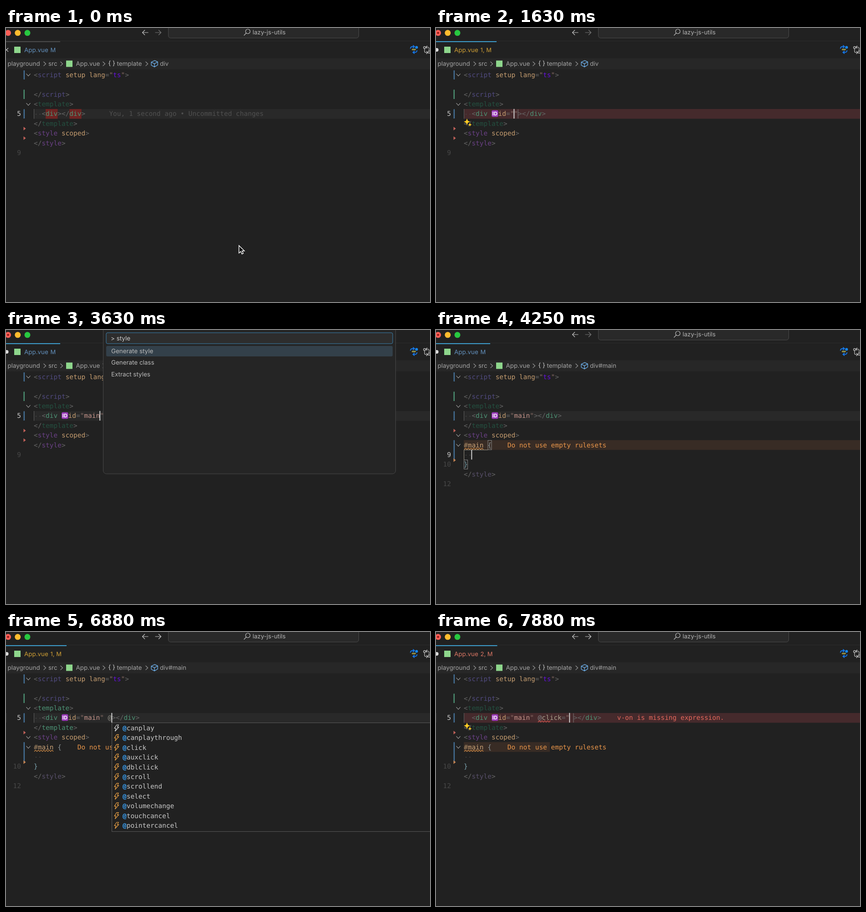
Animation, 931 px wide and 602 px high, one loop 8 s. Source, as an HTML page:

```html
<!DOCTYPE html>
<html lang="en">
<head>
<meta charset="utf-8">
<style>
html, body { margin: 0; width: 100%; height: 100%; overflow: hidden; background: #212121; }
svg { display: block; width: 931px; height: 602px; }
text { white-space: pre; text-rendering: geometricPrecision; }
.m { font: 14.46px "DejaVu Sans Mono", monospace; }
.u { font: 13.4px Inter, sans-serif; }
</style>
</head>
<body>
<svg id="stage" viewBox="0 0 931 602"></svg>
<script>
const LOOP = 8000, CW = 8.706, X0 = 61, PITCH = 21.4;
const stage = document.getElementById('stage');
const C = {
  p: '#666', div: '#4d9375', attr: '#c59d70', str: '#c5948b', quote: '#8b6f68',
  style: '#6b4186', scr: '#514b80', dim: '#245040'
};

const esc = s => s.replace(/&/g, '&amp;').replace(/</g, '&lt;');
const rowY = n => 102.8 + (n - 1) * PITCH;
const rect = (x, y, w, h, fill, more = '') => `<rect x="${x}" y="${y}" width="${w}" height="${h}" fill="${fill}" ${more}/>`;
const path = (d, stroke, w = 1.2, fill = 'none') => `<path d="${d}" stroke="${stroke}" stroke-width="${w}" fill="${fill}"/>`;
const circle = (x, y, r, fill, more = '') => `<circle cx="${x}" cy="${y}" r="${r}" fill="${fill}" ${more}/>`;
const mono = (x, y, s, fill) => `<text class="m" x="${x}" y="${y + 5}" fill="${fill}">${esc(s)}</text>`;
const ui = (x, y, s, fill = '#a5a5a5', size = 13.4) =>
  `<text class="u" x="${x}" y="${y + 4.8}" fill="${fill}" style="font-size:${size}px">${esc(s)}</text>`;

// Value of the last entry whose time has passed
const at = (t, list) => list.reduce((v, [time, next]) => t >= time ? next : v, null);
const within = (t, from, to) => t >= from && t < to;

// Coloured tokens in a row: text, colour, text, colour, ...
function tokens(x, y, ...list) {
  let out = '';
  for (let i = 0; i < list.length; i += 2) {
    out += mono(x, y, list[i], list[i + 1]);
    x += list[i].length * CW;
  }
  return out;
}

const down = (x, y) => path(`M${x - 4.5} ${y - 2.5}l4.5 5 4.5-5`, '#b0b0b0', 1.1);
const right = x => path(`M${x - 2.5} 74l5 4.7-5 4.7`, '#999');
const arrow = (x, dir, c) => path(`M${x - 6.5} 10h13M${x + dir} 4.5L${x + dir * 6.5} 10L${x + dir} 15.5`, c);
const marker = (y, c) => `<path d="M38.5 ${y - 4}l5 4-5 4z" fill="${c}"/>`;
const bar = (y, h) => rect(38.5, y, 2.6, h, 'url(#hatch)');
const caret = (x, y) => rect(x - 1, y - 10.6, 2, 21.2, '#d0d0d0');
const tabStop = x => rect(x - .5, 178.5, 1, 20.5, '#7d7d7d');
const dots = y => circle(66, y + 1, 1, '#4a4a4a') + circle(74.5, y + 1, 1, '#4a4a4a');

function wave(x, end, y, c) {
  let d = `M${x} ${y}`;
  for (let i = 0; x + i * 3 < end; i++) d += `l3 ${i % 2 ? 3 : -3}`;
  return path(d, c);
}

function windowBar(t, dirty) {
  let s = rect(0, 28, 931, 1, '#2b2b2b');
  ['#ff5f57', '#febc2e', '#28c840'].forEach((c, i) => s += circle(4.5 + i * 21.25, 10.8, 6.5, c));
  if (dirty) s += circle(4.5, 10.8, 2.3, '#8b1713');
  s += arrow(306, -1, '#c5c5c5') + arrow(334, 1, t >= 5630 ? '#c5c5c5' : '#777');
  s += rect(356.5, -10, 418, 32, '#292929', 'rx="5" stroke="#4a4a4a"');
  s += circle(531, 7.5, 5, 'none', 'stroke="#bbb" stroke-width="1.2"') + path('M527.5 11l-5 5.5', '#bbb');
  return s + ui(541.5, 9.6, 'lazy-js-utils', '#b5b5b5', 13.2);
}

function tabBar(t, dirty) {
  const tab = at(t, [[0, 0], [1500, 1], [2380, 0], [4500, 1], [7500, 2]]);
  const tone = ['#6391bd', '#cf9f35', '#dc7765'][tab];
  let s = rect(0, 29, [119, 133, 134.5][tab], 2, t >= 380 ? '#3b9ccc' : '#494949');
  s += dirty ? circle(1.5, 48, 4, '#ddd') : path('M-3 44l8 8M5 44l-8 8', '#ccc');
  s += rect(18, 41, 14, 14, '#8ed68c') + ui(40, 48, 'App.vue', tone);
  s += ui(97.5, 48, ['M', '1, M', '2, M'][tab], tone, 13);

  s += path('M888 45.5q0-4.5 4.5-4.5h4M893.5 38l3.5 3-3.5 3M902.5 49q0 4.5-4.5 4.5h-4M897 50.5l-3.5 3 3.5 3', '#1676e6', 1.8);
  s += rect(891, 45.5, 9, 3.5, '#8d8b45', 'rx="1.5"') + circle(901.5, 42.5, 3, '#1688f5');
  s += path('M919 45v6q0 3 3 3h4M923 51l3 3-3 3M929 51v-6q0-3-3-3h-4M925 39l-3 3 3 3', '#c5c5c5');
  const node = 'stroke="#c5c5c5" stroke-width="1.2"';
  return s + circle(919, 43, 2.3, '#212121', node) + circle(929, 53, 2.3, '#212121', node);
}

function breadcrumb(t) {
  let s = rect(0, 66.5, 931, 24.5, '#272727');
  s += ui(3.5, 78.5, 'playground') + right(85) + ui(93, 78.5, 'src') + right(122);
  s += rect(132, 71.5, 14, 14, '#8ed68c') + ui(153.5, 78.5, 'App.vue') + right(215);
  s += ui(224.5, 77.5, '{ }', '#ccc') + ui(243.5, 78.5, 'template') + right(309);
  s += path('M319 75l7.5-3.5 6.5 3v7l-7 4-7-3.5zM319 75l7 3.5 7-4M326 78.5v7', '#75beff');
  return s + ui(338, 78.5, at(t, [[0, 'div'], [2380, 'div#'], [2750, 'div#main']]));
}

function gutter(t, ruled) {
  let s = bar(93, 20) + rect(38.5, 135.5, 2.4, 20.5, '#4d9375') + bar(178.5, 20.5);
  s += down(49, 103) + down(49, 167.5) + marker(221, '#c4625a');
  const num = (n, c = '#484848') => mono(33 - String(n).length * CW, rowY(n), String(n), c);
  const inRule = ruled && t < 5630;
  if (!inRule) s += num(5, '#ccc');
  if (!ruled) return s + marker(242, '#c4625a') + num(9);
  s += down(49, 231.5) + down(49, 253) + bar(242, 43) + marker(286, '#c58555') + num(10) + num(12);
  return inRule ? s + num(9, '#ccc') : s;
}

function rule(t) {
  const y = rowY(8);
  const tint = at(t, [[0, 0], [4130, 870], [6880, 0], [7750, 189]]);
  let s = rect(61, 242, tint, PITCH, '#382c25');
  s += tokens(X0, y, '#', '#a88a66', 'main', '#c9a176', ' ', '', '{', '#889295');
  if (t >= 4130) s += mono(X0 + 11 * CW, y, 'Do not use empty rulesets', '#e8954a') + wave(62, 104, 262.5, '#d08b46');
  s += dots(rowY(9)) + mono(X0, rowY(10), '}', '#7ba3ae');
  if (t < 5630) {
    const box = 'stroke="#888"';
    s += rect(114, 242.5, 8, 20.5, 'none', box) + rect(61.5, 285.5, 8, 20, 'none', box);
    s += path('M114 263.5H61.5V285', '#9a9384', 1);
    if (!within(t, 5000, 5380)) s += caret(78.3, rowY(9));
  }
  return s;
}

const bolt = (x, y, c) => path(`M${x + 1} ${y - 7}h4l-2.5 5h3l-8 9 2-6.5h-3.5z`, c);

// Indices of the letters that match the query
function matches(word, query) {
  const whole = word.indexOf(query.slice(1));
  return [...query].map((ch, i) => i && whole > 0 ? whole + i - 1 : word.indexOf(ch));
}

function popup(x, items, query) {
  let s = rect(x + .5, 199.5, 720, items.length * PITCH + 3.5, '#212121', 'stroke="#5a5a5a"');
  items.forEach((word, i) => {
    const y = 211 + i * PITCH, hit = matches(word, query);
    s += bolt(x + 10, y, i ? '#e9a045' : '#ddd');
    const spans = [...word].map((ch, k) =>
      hit.includes(k) ? `<tspan fill="#3aa0f3" font-weight="bold">${ch}</tspan>` : ch).join('');
    s += `<text class="m" x="${x + 24}" y="${y + 5}" fill="#c8c8c8">${spans}</text>`;
  });
  return s;
}

const attributes = 'id inert inputmode is itemid itemprop itemref itemscope itemtype hidden'.split(' ');
const events = 'click canplay canplaythrough auxclick dblclick scroll scrollend select volumechange touchcancel pointercancel'
  .split(' ').map(e => '@' + e);
const byC = [events[1], events[2], events[0], ...events.slice(3)];

function star(x, y, r) {
  const a = r * .3, b = r * .7;
  return `<path d="M${x} ${y - r}l${a} ${b} ${b} ${a} ${-b} ${a} ${-a} ${b} ${-a} ${-b} ${-b} ${-a} ${b} ${-a}z" fill="#ffcc24"/>`;
}

function idBadge(x, y) {
  return rect(x + .2, y - 7.6, 14.4, 14.4, '#9c3abb', 'rx="3"') +
    `<text x="${x + 7.4}" y="${y + 3.8}" text-anchor="middle" fill="#fff" style="font:bold 11px Inter,sans-serif">ID</text>`;
}

function line5(t) {
  const y = rowY(5), late = t >= 7500, error = late || within(t, 1500, 2380);
  let s = rect(61, 178, 870, PITCH, error ? '#452a2c' : '#292929');
  s += rect(61, 178, 1, PITCH, '#606060') + rect(0, 178, 2, 21, '#292929');
  if (t < 500) s += [87, 139.3].map(x => rect(x, 178, 26.4, PITCH, '#6e2423')).join('');
  if (!late) s += dots(y);

  let x = X0 + 2 * CW;
  const put = (...list) => {
    s += tokens(x, y, ...list);
    for (let i = 0; i < list.length; i += 2) x += list[i].length * CW;
    return x;
  };
  let pos = put('<', C.p, 'div', C.div);
  if (t >= 630) pos = put(' ', C.p);
  if (t >= 1630) {
    const value = at(t, [[0, ''], [1880, 'm'], [2000, 'ma'], [2130, 'mai'], [2250, 'main']]);
    const event = at(t, [[0, ''], [6500, ' '], [6880, ' @'], [7000, ' @c'], [7130, ' @cl']]);
    s += idBadge(x, y);
    x += 14.6;
    put('id', C.attr, '=', C.p, '"', C.quote);
    if (within(t, 2380, 3000)) s += rect(x, 178.5, 4 * CW, 20.5, '#4b4848');
    pos = put(value, C.str);
    put('"', C.quote);
    if (t < 3000) s += tabStop(x);
    if (t >= 6250) pos = x;
    if (t >= 7750) {
      pos = put(' @', '#858585', 'click', '#aaa08c', '=', C.p, '"', C.quote);
      s += tabStop(put('"', C.quote));
    } else if (event) pos = put(event, '#929087');
  } else if (t >= 1000) pos = put(t < 1130 ? 'i' : 'id', C.attr);
  put('></', C.p, 'div', C.div, '>', C.p);

  if (t < 630) s += mono(X0 + 19 * CW, y, 'You, 1 second ago • Uncommitted changes', '#505050');
  if (late) s += mono(x + 4 * CW, y, 'v-on is missing expression.', '#e4685c') + wave(224, 249, 198, '#d9574e');
  if (t >= 250 && !within(t, 4000, 5630)) s += caret(pos, y);
  return s;
}

const commands = ['Generate style', 'Generate class', 'Extract styles', 'Add selector', 'Open preview', 'Format document',
  'Toggle comment', 'Go to symbol', 'Fold all regions', 'Rename symbol', 'Sort lines'];

function palette(t) {
  const picked = t >= 3630;
  let s = rect(213.5, -8, 642, 324, '#252525', 'rx="7" stroke="#484848"');
  s += rect(220, 6, 629, 24, '#2d2d2d', 'rx="3" stroke="#3b82b0"') + ui(230, 18, picked ? '> style' : '>', '#ccc');
  s += rect(220, 35, 629, 23, '#33404a', 'rx="3"');
  commands.slice(0, picked ? 3 : 11).forEach((c, i) => s += ui(231, 46 + i * 25.4, c, '#bbb'));
  return s;
}

function code(t, ruled) {
  const tpl = within(t, 6880, 7750) ? C.div : C.dim;
  const row = (n, ...list) => tokens(X0, rowY(n), ...list);
  return row(1, '<', C.p, 'script', C.scr, ' setup lang', C.attr, '=', C.p, '"', C.quote, 'ts', '#6410dc', '"', C.quote, '>', C.p) +
    row(3, '</', C.p, 'script', C.scr, '>', C.p) +
    row(4, '<', C.p, 'template', tpl, '>', C.p) +
    row(6, '</', C.p, 'template', tpl, '>', C.p) +
    row(7, '<', C.p, 'style', C.style, ' scoped', C.attr, '>', C.p) +
    row(ruled ? 11 : 8, '</', C.p, 'style', ruled ? '#58506a' : C.style, '>', C.p);
}

function scene(t) {
  const ruled = t >= 4000, dirty = t >= 630;
  let s = `<defs><pattern id="hatch" width="3" height="3" patternUnits="userSpaceOnUse">` +
    rect(0, 0, 3, 3, '#26384a') + path('M0 3L3 0', '#5b9ad0', 1.3) + '</pattern></defs>';
  s += rect(0, 0, 931, 602, '#212121') + windowBar(t, dirty) + tabBar(t, dirty) + breadcrumb(t);
  s += gutter(t, ruled) + line5(t) + code(t, ruled);
  if (ruled) s += rule(t);
  if (t >= 7500 || within(t, 1500, 2380)) s += star(68, 206, 7) + star(74.5, 212.5, 4);

  if (within(t, 1250, 1630)) s += popup(139, attributes, 'id');
  if (within(t, 6880, 7000)) s += popup(232, byC, '@');
  if (within(t, 7000, 7130)) s += popup(241, byC, '@c');
  if (within(t, 7130, 7750)) s += popup(250, events, '@cl');
  if (within(t, 3000, 4000)) s += palette(t);
  if (t < 250) s += path('M511.5 478v16.5l4-3.5 2.5 5.5 3-1.3-2.5-5.5h5z', '#fff', 1.4, '#111');
  return s;
}

let last = '';
function frame(now) {
  const next = scene(now % LOOP);
  if (next !== last) stage.innerHTML = last = next;
  requestAnimationFrame(frame);
}
frame(0);
</script>
</body>
</html>
```
